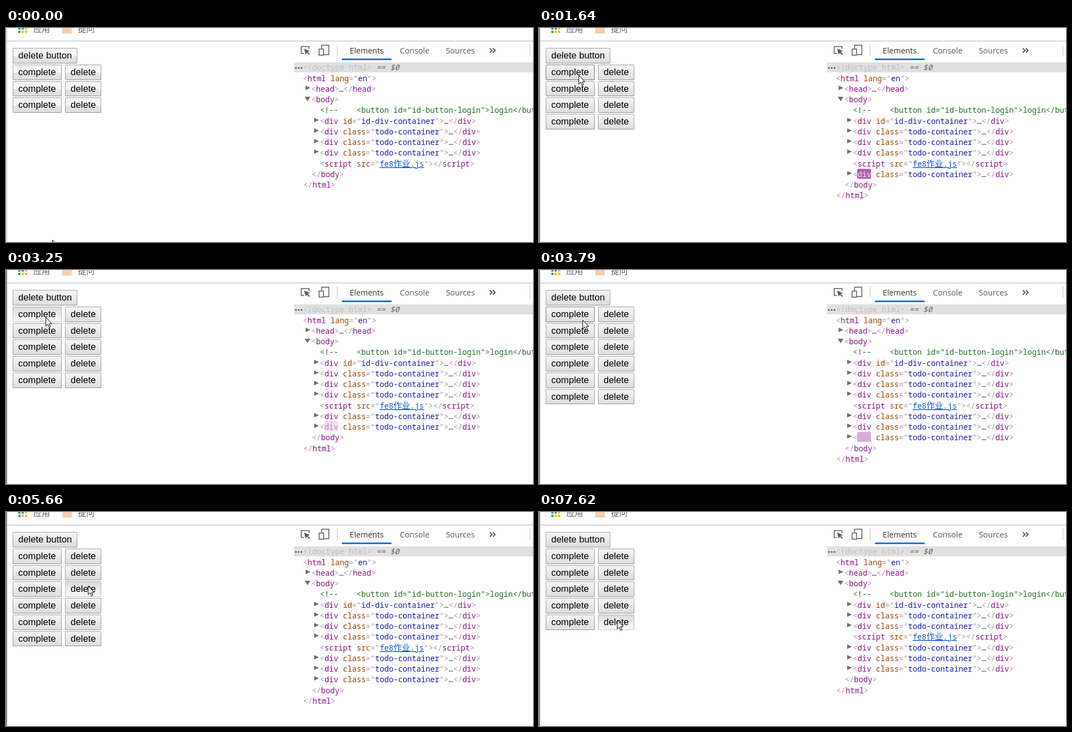
Write an HTML page that moves like this. It is 946 px wide and 386 px high and loops after 8 s.

```html
<!DOCTYPE html>
<html lang="en">
<head>
<meta charset="utf-8">
<title>Todo buttons</title>
<style>
html, body { margin: 0; width: 100%; height: 100%; overflow: hidden; background: #fefefe; }
svg { display: block; }
.ui { font: 14.2px "Open Sans", "Noto Sans", sans-serif; fill: #5a5a5a; }
.cjk { font: 15px "Noto Sans CJK SC", "Noto Sans CJK", sans-serif; }
.btn { font: 16.667px "Liberation Sans", Arial, sans-serif; fill: #000; }
.code { font: 13.745px "Noto Sans Mono", "DejaVu Sans Mono", monospace; fill: #303942; }
.p { fill: #a894a6; }
.tag { fill: #881280; }
.attr { fill: #994500; }
.val { fill: #1a1aa6; }
.note { fill: #236e25; }
.link { fill: #1155cc; text-decoration: underline; }
.dim { fill: #c0c0c0; }
.icon { fill: none; stroke: #5a5a5a; stroke-width: 1.5; }
</style>
</head>
<body>
<svg width="946" height="386" viewBox="0 0 946 386">
  <defs>
    <linearGradient id="normal" x2="0" y2="1">
      <stop stop-color="#f4f4f4"/><stop offset=".38" stop-color="#ededed"/><stop offset="1" stop-color="#dcdcdc"/>
    </linearGradient>
    <linearGradient id="idle" x2="0" y2="1">
      <stop stop-color="#f1f1f1"/><stop offset=".5" stop-color="#f8f8f8"/>
      <stop offset=".55" stop-color="#e6e6e6"/><stop offset="1" stop-color="#dcdcdc"/>
    </linearGradient>
    <linearGradient id="pressed" x2="0" y2="1">
      <stop stop-color="#dadada"/><stop offset=".6" stop-color="#eeeeee"/><stop offset="1" stop-color="#f7f7f7"/>
    </linearGradient>
  </defs>
  <rect width="946" height="386" fill="#fefefe"/>

  <g id="apps"></g>
  <g class="cjk" fill="#5a5d61"><text x="49" y="7">应用</text><text x="129" y="7">提问</text></g>
  <rect x="101" y="-7" width="17" height="17" fill="#f8cdb0"/>
  <path d="M0 23.5H946" stroke="#b6b6b6"/>

  <rect x="517" y="62" width="429" height="18" fill="#e0e0e0"/>
  <path class="icon" d="M535 46H530V33.5H544V38"/>
  <path d="M535 37L545.5 41.5 541.5 43 545.5 47 544 48.5 540 44.5 538 48Z" fill="#5a5a5a"/>
  <path class="icon" d="M566.5 37V31H579.5V48H571M562 38H570V49H562Z"/>
  <path d="M594.5 30V50M940.5 30V50" stroke="#c4c4c4"/>
  <rect x="603" y="55" width="89" height="3" fill="#1a73e8"/>
  <g class="ui">
    <text x="617" y="46" fill="#333">Elements</text>
    <text x="707" y="46">Console</text>
    <text x="789.5" y="46">Sources</text>
  </g>
  <path class="icon" d="M868.5 36.5L872.5 40.5 868.5 44.5M874 36.5L878 40.5 874 44.5" style="stroke-width:2"/>
  <g fill="#5a5a5a"><circle cx="520.5" cy="72" r="1.6"/><circle cx="525.5" cy="72" r="1.6"/><circle cx="530.5" cy="72" r="1.6"/></g>

  <g id="scene"></g>
  <path id="cursor" d="M.5 .5V16L4 12.7 6.5 18.5 8.9 17.5 6.5 11.9H11.3Z" fill="#fff" stroke="#000" stroke-linejoin="round"/>
</svg>
<script>
const LOOP = 8000, CHAR = 8.247, PITCH = 29.75;
const scene = document.getElementById('scene');
const cursor = document.getElementById('cursor');

// time, x, y of the pointer; every position is held until the next
const pointer = [
  [0, 83, 382], [150, 97, 371], [270, 110, 359], [420, 103, 268], [540, 88, 159],
  [690, 78, 112], [810, 71, 86], [960, 71, 85], [3670, 73, 86], [3790, 78, 90],
  [3940, 95, 110], [4060, 109, 132], [4210, 116, 130], [4330, 122, 128], [4450, 127, 127],
  [4570, 129, 126], [4690, 137, 127], [4810, 144, 129], [5270, 146, 131], [5390, 147, 133],
  [5930, 146, 140], [6050, 144, 152], [6200, 140, 170], [6330, 137, 187], [6480, 137, 193],
  [6630, 140, 195]
];
const presses = [[1390, 1510], [2050, 2170], [3250, 3400], [5660, 5780], [7620, LOOP]];
const added = [1510, 2320, 3400];
const ACTIVE = 1390, REMOVED = 5780;

document.getElementById('apps').innerHTML = [['#34a853', '#4285f4', '#fbbc05'], ['#34a853', '#fbbc05', '#fbbc05']]
  .map((row, r) => row.map((color, c) =>
    `<rect x="${22 + 6 * c}" y="${-1 + 6 * r}" width="4" height="4" fill="${color}"/>`).join('')).join('');

const stepAt = (steps, t) => steps.filter(s => s[0] <= t).pop();
const mix = (a, b, k) => `rgb(${a.map((v, i) => Math.round(v + (b[i] - v) * k))})`;
const clamp = v => Math.max(0, Math.min(1, v));

const span = (cls, text) => `<tspan class="${cls}">${text.replace(/</g, '&lt;').replace(/ /g, '\u00a0')}</tspan>`;
const attr = (name, value) =>
  span('attr', ' ' + name) + span('p', '="') + span('val', value) + span('p', '"');
const open = (name, attrs = '', style = '') =>
  span('p', '<') + `<tspan class="tag" style="${style}">${name}</tspan>` + attrs + span('p', '>');
const close = name => span('p', '</') + span('tag', name) + span('p', '>');

// Highlight of a freshly changed node: purple, then pink, then gone
function flash(age) {
  const a = Math.floor(age / 130) * 130;
  if (a < 0 || a >= 1170) return null;
  const pink = clamp(a / 540), gone = clamp((a - 930) / 240);
  return {
    back: mix([158, 54, 153], [245, 219, 244], pink),
    alpha: 1 - gone,
    text: gone ? mix([172, 145, 172], [136, 18, 128], gone) : mix([255, 255, 255], [172, 145, 172], pink)
  };
}

function domTree(t) {
  const lines = [];
  const put = (level, html, arrow, mark) => lines.push({ level, html, arrow, mark });
  const node = (name, attrs, age) => {
    const glow = flash(age);
    return [open(name, attrs, glow ? 'fill:' + glow.text : ''), glow && { ...glow, chars: name.length }];
  };
  const div = (attrs, age = -1) => {
    const [html, mark] = node('div', attrs, age);
    put(2, html + '…' + close('div'), 'right', mark);
  };
  const todo = age => div(attr('class', 'todo-container'), age);

  put(0, span('dim', '<!doctype html>') + '<tspan font-style="italic" fill="#666">\u00a0==\u00a0$0</tspan>');
  put(0, open('html', attr('lang', 'en')));
  put(1, open('head') + '…' + close('head'), 'right');
  const [body, bodyMark] = node('body', '', t - REMOVED);
  put(1, body, 'down', bodyMark);
  put(2, span('note', '<!--    <button id="id-button-login">login</button> -->'));
  div(attr('id', 'id-div-container'));
  for (let i = t < REMOVED ? 3 : 2; i > 0; i--) todo();
  put(2, span('p', '<') + span('tag', 'script') + span('attr', ' src') + span('p', '="') +
    '<tspan class="link">fe8<tspan class="cjk">作业</tspan>.js</tspan>' + span('p', '">') + close('script'));
  added.filter(at => at <= t).forEach(at => todo(t - at));
  put(1.05, close('body'));
  put(.05, close('html'));

  return lines.map(({ level, html, arrow, mark }, i) => {
    const x = 533 + 15.3 * level, y = Math.round(76.3 + 19.25 * i);
    let out = '';
    if (mark) out += `<rect x="${Math.floor(x + CHAR)}" y="${y - 15}" width="${Math.round(mark.chars * CHAR)}" height="18" rx="2.5" fill="${mark.back}" opacity="${mark.alpha}"/>`;
    if (arrow === 'right') out += `<path d="M${x - 10.5} ${y - 11}l8.5 4-8.5 4z" fill="#6e6e6e"/>`;
    if (arrow === 'down') out += `<path d="M${x - 12} ${y - 10}h10l-5 8z" fill="#6e6e6e"/>`;
    return out + `<text class="code" x="${x}" y="${y}">${html}</text>`;
  }).join('');
}

function buttons(t, px, py) {
  const rows = 3 + (t >= 1510) + (t >= 2170) + (t >= 3400) - (t >= REMOVED);
  const down = presses.some(([from, to]) => t >= from && t < to);
  const button = (label, x, w, row) => {
    const y = Math.round(36 + PITCH * row), h = Math.round(63.75 + PITCH * row) - y;
    const over = px >= x && px < x + w && py >= y && py < y + h;
    const fill = over && down ? 'pressed' : t < ACTIVE ? 'idle' : 'normal';
    const edge = over ? (down ? .2 : .5) : .33;
    return `<rect x="${x}" y="${y}" width="${w}" height="${h}" rx="1.5" fill="url(#${fill})"/>` +
      `<rect x="${x + .5}" y="${y + .5}" width="${w - 1}" height="${h - 1}" rx="1" fill="none" stroke="#000" stroke-opacity="${edge}"/>` +
      `<text class="btn" x="${x + 10}" y="${Math.round(55.15 + PITCH * row)}">${label}</text>`;
  };
  let out = button('delete button', 12, 116, 0);
  for (let row = 1; row <= rows; row++)
    out += button('complete', 12, 88, row) + button('delete', 106, 65, row);
  return out;
}

let shown = '';
function render() {
  const t = performance.now() % LOOP;
  const [, x, y] = stepAt(pointer, t);
  const edge = `<rect width="2" height="386" fill="${t < ACTIVE ? '#d6d6d6' : '#858585'}"/>`;
  const html = edge + buttons(t, x, y) + domTree(t);
  if (html !== shown) scene.innerHTML = shown = html;
  cursor.setAttribute('transform', `translate(${x} ${y})`);
  requestAnimationFrame(render);
}
render();
</script>
</body>
</html>
```
